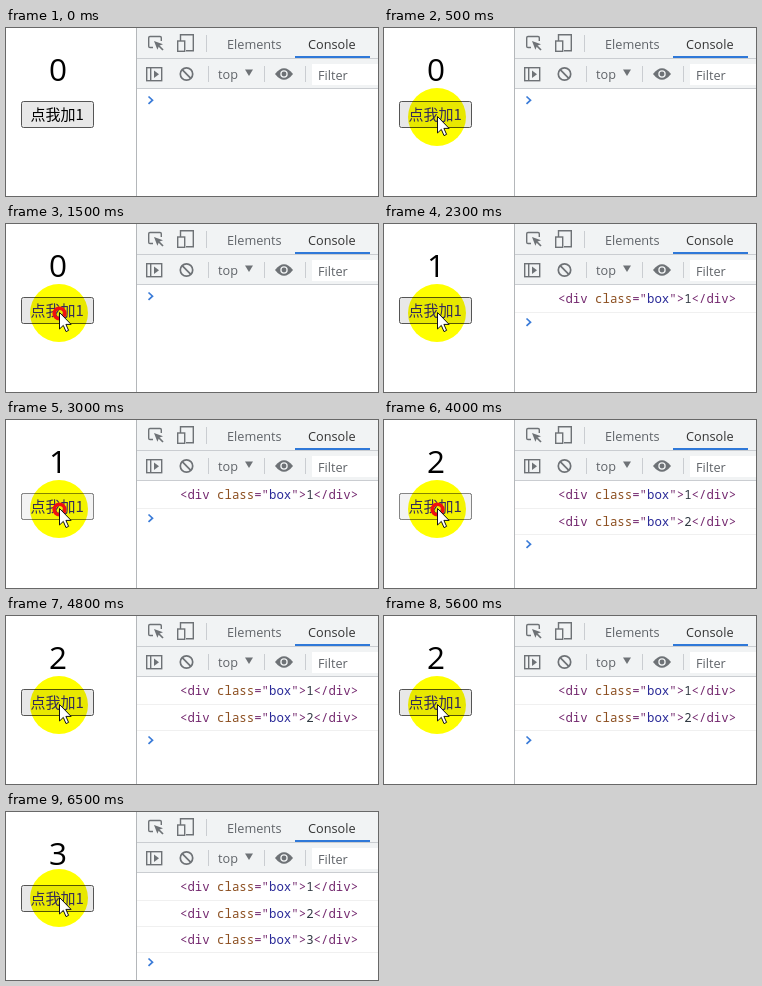
Recreate the animation shown at these times as an HTML page. Size 372 by 168 pixels, loop 7600 ms.

```html
<!DOCTYPE html>
<html lang="zh">
<head>
<meta charset="utf-8">
<title>Counter</title>
<style>
html, body { margin: 0; width: 100%; height: 100%; overflow: hidden; background: #fff; }
svg { display: block; width: 372px; height: 168px; }
text { white-space: pre; }
.ui { font: 12.7px "Open Sans", "Noto Sans", sans-serif; fill: #5f6368; }
.ui .on { fill: #333; }
.num { font: 31.5px "Open Sans", "Noto Sans", sans-serif; text-anchor: middle; }
.label { font: 15px "Noto Sans CJK SC", "Noto Sans CJK", sans-serif; }
.code { font: 12.36px "Noto Sans Mono", "DejaVu Sans Mono", monospace; fill: #74296f; }
.attr { fill: #8c4f20; }
.val { fill: #2a2a98; }
.txt { fill: #303942; }
.rule { stroke: #f0f0f0; }
.icon { fill: none; stroke: #6e7276; stroke-width: 1.4; }
.line { stroke: #cacdd1; }
.halo { mix-blend-mode: multiply; }

.anim { animation: 7600ms step-end infinite; }
.n0 { animation-name: zero; }
.n1 { animation-name: one; }
.n2 { animation-name: two; }
.n3, .r3 { animation-name: from3; }
.r1 { animation-name: from1; }
.r2 { animation-name: from2; }
.prompt { animation-name: prompt; }
.move { animation-name: move; }
.ring { animation-name: ring; }
.down { animation-name: down; }
.label { animation-name: tint; }

@keyframes zero { 0% { opacity: 1 } 23.68%, 100% { opacity: 0 } }
@keyframes one { 0% { opacity: 0 } 23.68% { opacity: 1 } 46.05%, 100% { opacity: 0 } }
@keyframes two { 0% { opacity: 0 } 46.05% { opacity: 1 } 78.94%, 100% { opacity: 0 } }
@keyframes from1 { 0% { opacity: 0 } 23.68%, 100% { opacity: 1 } }
@keyframes from2 { 0% { opacity: 0 } 46.05%, 100% { opacity: 1 } }
@keyframes from3 { 0% { opacity: 0 } 78.94%, 100% { opacity: 1 } }
@keyframes prompt {
  0% { transform: none }
  23.68% { transform: translateY(26px) }
  46.05% { transform: translateY(52px) }
  78.94%, 100% { transform: translateY(78px) }
}
@keyframes move {
  0% { opacity: 0; transform: translate(208px, 7px) }
  1.31% { opacity: 1; transform: translate(208px, 7px) }
  2.63% { opacity: 1; transform: translate(120px, 5px) }
  3.94% { opacity: 1; transform: translate(50px, 3px) }
  5.26% { opacity: 1; transform: translate(12px, 1px) }
  6.57% { opacity: 1; transform: none }
  82.89%, 100% { opacity: 1; transform: translateY(-3px) }
}
@keyframes ring {
  0% { opacity: 0 }
  19.73% { opacity: 1 } 25% { opacity: 0 }
  38.15% { opacity: 1 } 53.94% { opacity: 0 }
  75% { opacity: 1 } 81.57%, 100% { opacity: 0 }
}
@keyframes down {
  0% { opacity: 0 }
  21.05% { opacity: 1 } 23.68% { opacity: 0 }
  38.15% { opacity: 1 } 53.94% { opacity: 0 }
  76.31% { opacity: 1 } 78.94%, 100% { opacity: 0 }
}
@keyframes tint { 0% { fill: #000 } 6.57%, 100% { fill: #352c58 } }
</style>
</head>
<body>
<svg viewBox="0 0 372 168">
  <rect width="372" height="168" fill="#fff"/>

  <!-- page -->
  <g class="num">
    <text class="anim n0" x="52" y="53">0</text>
    <text class="anim n1" x="52" y="53">1</text>
    <text class="anim n2" x="52" y="53">2</text>
    <text class="anim n3" x="52" y="53">3</text>
  </g>
  <rect x="15.5" y="73.5" width="72" height="26" rx="2" fill="#e8e8e8" stroke="#555"/>
  <rect class="anim down" x="15.5" y="73.5" width="72" height="26" rx="2" fill="#f3f3f3" stroke="#858585"/>

  <!-- toolbars -->
  <rect x="130" width="242" height="61" fill="#f1f3f4"/>
  <path class="line" d="M130 30.5H372M130 60.5H372M200.5 7V24M202.5 38V54M258.5 38V54M299.5 38V54"/>
  <path d="M130.5 0V168" stroke="#b4b7ba"/>
  <rect x="289" y="28" width="75" height="2" fill="#2f78d8"/>
  <rect x="306" y="36" width="66" height="21" fill="#fff"/>

  <g class="icon">
    <path d="M147 19.5H144a1.3 1.3 0 0 1-1.3-1.3V9.8a1.3 1.3 0 0 1 1.3-1.3H154a1.3 1.3 0 0 1 1.3 1.3V13"/>
    <path d="M152 17l5 5" stroke-width="1.7"/>
    <path d="M174.5 13V6.7H187.3V22.7H180"/>
    <rect x="171.7" y="13" width="7" height="10.3"/>
    <rect x="140.7" y="39.7" width="15" height="13"/>
    <path d="M144.7 39.7V52.7"/>
    <circle cx="180.5" cy="46" r="6.2" stroke-width="1.7"/>
    <path d="M176.2 41.7l8.6 8.6" stroke-width="1.7"/>
  </g>
  <g fill="#6e7276">
    <path d="M148 13l9 3.2-3.9 1.6-1.7 4z"/>
    <path d="M148 42.5l5 3.7-5 3.7z"/>
    <path d="M239 41.5h8l-4 6.5z"/>
    <path d="M269 46q9-11.5 18 0q-9 11.5-18 0z"/>
  </g>
  <circle cx="278" cy="46" r="3.1" fill="none" stroke="#f1f3f4" stroke-width="1.3"/>

  <g class="ui">
    <text x="221" y="21">Elements</text>
    <text class="on" x="302" y="21">Console</text>
    <text x="212" y="50.5">top</text>
    <text x="312" y="51.5">Filter</text>
  </g>

  <!-- console -->
  <g class="code">
    <g class="anim r1">
      <path class="rule" d="M131 88.5H372"/>
      <text x="174" y="79">&lt;div <tspan class="attr">class</tspan>="<tspan class="val">box</tspan>"&gt;<tspan class="txt">1</tspan>&lt;/div&gt;</text>
    </g>
    <g class="anim r2">
      <path class="rule" d="M131 114.5H372"/>
      <text x="174" y="106">&lt;div <tspan class="attr">class</tspan>="<tspan class="val">box</tspan>"&gt;<tspan class="txt">2</tspan>&lt;/div&gt;</text>
    </g>
    <g class="anim r3">
      <path class="rule" d="M131 140.5H372"/>
      <text x="174" y="132">&lt;div <tspan class="attr">class</tspan>="<tspan class="val">box</tspan>"&gt;<tspan class="txt">3</tspan>&lt;/div&gt;</text>
    </g>
  </g>
  <path class="anim prompt" d="M142.5 68.5l4 3.7-4 3.7" fill="none" stroke="#3a7bd8" stroke-width="1.7"/>

  <!-- pointer -->
  <circle class="anim move halo" cx="53" cy="89" r="29" fill="#ff0"/>
  <text class="anim label" x="24.5" y="92">点我加1</text>
  <circle class="anim ring" cx="53.5" cy="89.5" r="5.3" fill="none" stroke="#f01010" stroke-width="3.6"/>
  <path class="anim move" d="M53.5 88.5v16.5l3.8-3.6 2.7 6.2 2.6-1.2-2.7-6h5.2z" fill="#fff" stroke="#111"/>
</svg>
</body>
</html>
```
